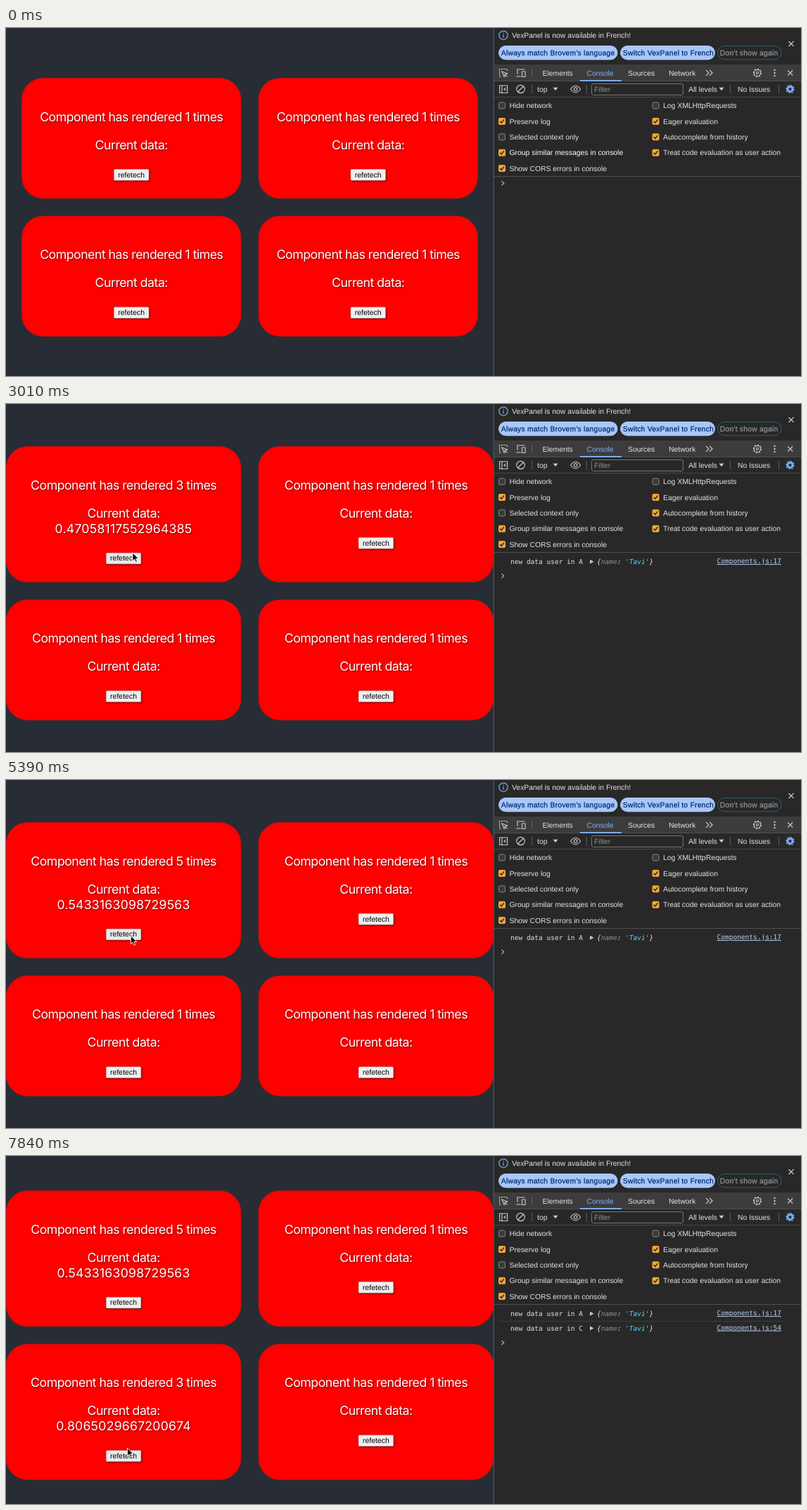
These frames come from a looping animation (1130x496 px, 8000 ms). An HTML page:

```html
<!DOCTYPE html>
<html lang="en">
<head>
<meta charset="utf-8">
<title>Component render demo</title>
<style>
  html, body { margin: 0; width: 100%; height: 100%; overflow: hidden; background: #282c34; }
  svg { display: block; width: 100%; height: 100%; }
  text { font: 10.4px "Liberation Sans", Arial, sans-serif; fill: #e3e3e3; text-rendering: geometricPrecision; }
  .card text { font: 17.8px Inter, sans-serif; letter-spacing: -.55px; fill: #fff; text-anchor: middle; }
  .card .value { letter-spacing: .14px; }
  .card .label { font: 10.5px "Liberation Sans", Arial, sans-serif; letter-spacing: 0; fill: #000; }
  .content { filter: drop-shadow(1px 1px 1px rgba(0, 0, 0, .55)); }
  .pill { letter-spacing: .2px; stroke-width: .25px; }
  .log, .log tspan { font: 9.5px "DejaVu Sans Mono", monospace; }
  .log .object { font-style: italic; }
  .log .key { font-style: italic; fill: #8f8f8f; }
  .log .string { font-style: italic; fill: #5cd5fb; }
  .link { fill: #bcd2f5; text-decoration: underline; }
  .icon { fill: none; stroke: #c7c7c7; stroke-width: 1.2; }
</style>
</head>
<body>
<svg viewBox="0 0 1130 496" preserveAspectRatio="none">
  <rect width="1130" height="496" fill="#282c34"/>
  <g id="cards"></g>
  <g id="panel"></g>
  <g id="console"></g>
  <path id="cursor" d="M0 0V11.6L2.7 9.2 4.5 13.4 6.4 12.6 4.6 8.5H8.3Z" fill="#000" stroke="#fff" stroke-width=".9"/>
</svg>
<script>
const LOOP = 8000;
const byId = id => document.getElementById(id);
const within = (t, from, to) => t >= from && t < to;

const text = (x, y, content, attrs = '') => `<text x="${x}" y="${y}" ${attrs}>${content}</text>`;
const rect = (x, y, w, h, attrs) => `<rect x="${x}" y="${y}" width="${w}" height="${h}" ${attrs}/>`;
const icon = (d, attrs = '') => `<path class="icon" d="${d}" ${attrs}/>`;
const cross = (x, y) => icon(`M${x - 3.5} ${y - 3.5}l7 7m0-7l-7 7`);
const divider = (x, y) => icon(`M${x} ${y - 6}v12`, 'style="stroke:#5e5e5e;stroke-width:1"');
const rule = (x, y, w, color) => rect(x, y, w, 1, `fill="${color}"`);
const arrowDown = (x, y) => `<path d="M${x} ${y}h7l-3.5 4.5z" fill="#c7c7c7"/>`;

function gear(x, y, color, filled) {
  const [radius, width] = filled ? [3.6, 3] : [4.5, 1.1];
  return `<g fill="none" stroke="${color}" stroke-width="1.3">
    <circle cx="${x}" cy="${y}" r="${radius}" stroke-width="${width}"/>
    <circle cx="${x}" cy="${y}" r="5.6" pathLength="16" stroke-dasharray="1"/>
    ${filled ? '' : `<circle cx="${x}" cy="${y}" r="1.5" stroke-width="1"/>`}
  </g>`;
}

function pill(x, w, label, fill, stroke, color) {
  return rect(x + .5, 25.5, w - 1, 19.5, `rx="9.75" fill="${fill}" stroke="${stroke}"`) +
    text(x + 3.8, 39, label, `class="pill" style="fill:${color};stroke:${color}"`);
}

function checkbox(x, y, label, checked, attrs) {
  const box = checked
    ? rect(x, y - 5, 10, 10, 'rx="2" fill="#f9a33c"') +
      icon(`M${x + 2.2} ${y}l2 2.2 3.7-4.6`, 'style="stroke:#282828;stroke-width:1.5"')
    : rect(x + .5, y - 4.5, 9, 9, 'rx="1.8" fill="#3b3b3b" stroke="#858585"');
  return box + text(x + 15.5, y + 3.7, label, attrs);
}

function buildPanel() {
  const rowY = row => 110.5 + row * 22.4;
  const left = [['Hide network', 0], ['Preserve log', 1], ['Selected context only', 0],
    ['Group similar messages in console', 1, 'id="hovered"'], ['Show CORS errors in console', 1]];
  const right = [['Log XMLHttpRequests', 0], ['Eager evaluation', 1],
    ['Autocomplete from history', 1], ['Treat code evaluation as user action', 1]];
  const column = (x, items) =>
    items.map(([label, on, attrs], i) => checkbox(x, rowY(i), label, on, attrs)).join('');

  return rect(693, 0, 437, 496, 'fill="#282828"') +
    rect(692.5, 0, 1.5, 496, 'fill="#4b4d50"') +
    // Info bar
    '<circle class="icon" cx="707" cy="10.3" r="6.2" style="stroke:#7cacf8"/>' +
    icon('M707 9.3v4.2M707 6.8v1.3', 'style="stroke:#7cacf8"') +
    text(719, 14, 'VexPanel is now available in French!') +
    pill(700, 169.5, "Always match Brovem's language", '#a8c7fa', '#a8c7fa', '#062e6f') +
    pill(873, 135, 'Switch VexPanel to French', '#a8c7fa', '#a8c7fa', '#062e6f') +
    pill(1011, 91.5, "Don't show again", 'none', '#24638a', '#929292') +
    cross(1116, 22.5) +
    // Tabs
    rect(694, 52, 436, 23.5, 'fill="#3c3c3c"') + rule(694, 75, 436, '#4f4f4f') +
    icon('M712.5 61v-2.5h-11v11h3', 'stroke-dasharray="2 1"') +
    icon('M705 62l7.5 3-3.2 1.2-1.2 3.3zM709 66l3.5 3.5') +
    icon('M727 66v-7h10.5M725 69h7M733.5 62h4.5v7.5h-4.5z') +
    divider(747.5, 64) +
    text(762.5, 67.6, 'Elements') +
    text(825.5, 67.6, 'Console', 'style="fill:#7cacf8"') +
    rect(816, 74, 59, 2, 'fill="#7cacf8"') +
    text(884, 67.6, 'Sources') + text(942, 67.6, 'Network') +
    icon('M995 60l4 4-4 4M1000 60l4 4-4 4') +
    gear(1068, 64, '#c7c7c7', false) +
    [60, 64, 68].map(y => `<circle cx="1092.5" cy="${y}" r="1.2" fill="#c7c7c7"/>`).join('') +
    cross(1114.7, 64) +
    // Toolbar
    icon('M701.6 82h11v10.5h-11zM705 82v10.5M710.5 85l-2.5 2.2 2.5 2.2') +
    '<circle class="icon" cx="731.5" cy="87" r="5.7"/>' + icon('M735.5 83l-8 8') +
    divider(747.5, 87) + text(755, 90.6, 'top') + arrowDown(777.5, 84.8) +
    icon('M802.5 87q7-9.5 14 0q-7 9.5-14 0z') +
    '<circle class="icon" cx="809.5" cy="87" r="2.2"/>' +
    divider(825, 87) +
    rect(832.5, 79.5, 130, 16, 'rx="2.5" fill="#282828" stroke="#757575"') +
    text(836, 90.8, 'Filter', 'style="fill:#929292"') +
    text(970, 90.6, 'All levels') + arrowDown(1013.5, 84.8) +
    divider(1029.5, 87) + text(1040, 90.6, 'No Issues') + divider(1098.5, 87) +
    gear(1114.5, 87, '#7cacf8', true) +
    rule(694, 98, 436, '#484848') +
    // Settings
    column(700, left) + column(918.5, right) +
    rule(694, 211, 436, '#505050');
}

function logRow(y, component, line) {
  return `<g class="log">${text(717, y, `new data user in ${component}`, 'class="log"')}
    <path d="M830 ${y - 6.2}v6l5.5-3z" fill="#c7c7c7"/>
    ${text(840, y, `{<tspan class="key">name</tspan>: <tspan class="string">'Tavi'</tspan>}`, 'class="log object"')}
    ${text(1010.5, y - .8, `Components.js:${line}`, 'class="log link"')}</g>`;
}

function renderConsole(rows) {
  const promptY = [221.3, 245, 266][rows];
  return (rows > 0 ? logRow(228, 'A', 17) : '') +
    (rows > 1 ? rule(700, 235, 405, '#3d3d3d') + logRow(248.6, 'C', 54) : '') +
    icon(`M704.5 ${promptY - 3}l3.2 3-3.2 3`, 'style="stroke:#7cacf8;stroke-width:1.4"');
}

function renderCard(x, y, w, h, { count = 1, value, spin, button = '#efefef' }) {
  const cx = x + w / 2;
  let content;
  if (spin !== undefined) {
    const cy = y + h / 2 - .6;
    content = `<circle cx="${cx}" cy="${cy}" r="17" fill="none" stroke="#fff" stroke-width="4" pathLength="4"
      stroke-dasharray="3 1" transform="rotate(${135 + spin * .36} ${cx} ${cy})"/>`;
  } else {
    const by = y + (value ? 151.7 : 129.9);
    content = text(cx, y + 61.4, `Component has rendered ${count} times`) +
      text(cx, y + 101.4, 'Current data:') +
      (value ? text(cx, y + 123.4, value, 'class="value"') : '') +
      rect(cx - 24.8, by + .2, 49.6, 15.8, `rx="1.5" fill="${button}" stroke="#999" stroke-width=".5"`) +
      text(cx, by + 11.5, 'refetech', 'class="label"');
  }
  return `<g class="card">
    ${rect(x + .4, y + .4, w - .8, h - .8, 'rx="30" fill="#f00" stroke="#d01014" stroke-width=".8"')}
    <g class="content">${content}</g></g>`;
}

function renderCards(cards) {
  const gap = 24.5;
  const width = cards.some(c => c.value) ? 334.3 : 312;
  const heights = [0, 2].map(i => cards[i].value || cards[i + 1].value ? 194 : 172);
  const left = 346.5 - width - gap / 2;
  const top = 255.5 - (heights[0] + heights[1] + gap) / 2;
  return cards.map((card, i) => {
    const row = i >> 1;
    return renderCard(left + (i % 2) * (width + gap), top + row * (heights[0] + gap), width, heights[row], card);
  }).join('');
}

const HOVER = '#e9e9e9', ACTIVE = '#f5f5f5';

function firstCard(t) {
  if (t < 2520) return { button: t < 2380 ? undefined : ACTIVE };
  if (t < 3010) return { spin: t - 2520 };
  if (t < 4830) {
    const button = t < 3500 ? HOVER : t < 4690 ? undefined : ACTIVE;
    return { count: 3, value: '0.47058117552964385', button };
  }
  if (t < 5350) return { spin: t - 4830 };
  return { count: 5, value: '0.5433163098729563', button: t < 5880 ? HOVER : undefined };
}

function thirdCard(t) {
  if (t < 7210) return { button: t < 6440 ? undefined : t < 7070 ? HOVER : ACTIVE };
  if (t < 7770) return { spin: t - 7210 };
  return { count: 3, value: '0.8065029667200674', button: HOVER };
}

function cursorAt(t) {
  if (within(t, 1890, 3640)) return [180, 212];
  if (within(t, 5110, 6160)) return [177.5, 222];
  if (t >= 7350) return [172.5, 416];
}

byId('panel').innerHTML = buildPanel();
const start = performance.now();
let shownRows = -1;

function draw() {
  const elapsed = (performance.now() - start) % LOOP;
  const t = Math.floor(elapsed / 70) * 70;
  byId('cards').innerHTML = renderCards([firstCard(t), {}, thirdCard(t), {}]);

  const rows = t < 3010 ? 0 : t < 7770 ? 1 : 2;
  if (rows !== shownRows) byId('console').innerHTML = renderConsole(shownRows = rows);

  byId('hovered').style.fill = t < 140 ? '#fff' : '';
  const tip = cursorAt(t);
  byId('cursor').style.display = tip ? '' : 'none';
  if (tip) byId('cursor').setAttribute('transform', `translate(${tip})`);
  requestAnimationFrame(draw);
}
draw();
</script>
</body>
</html>
```
